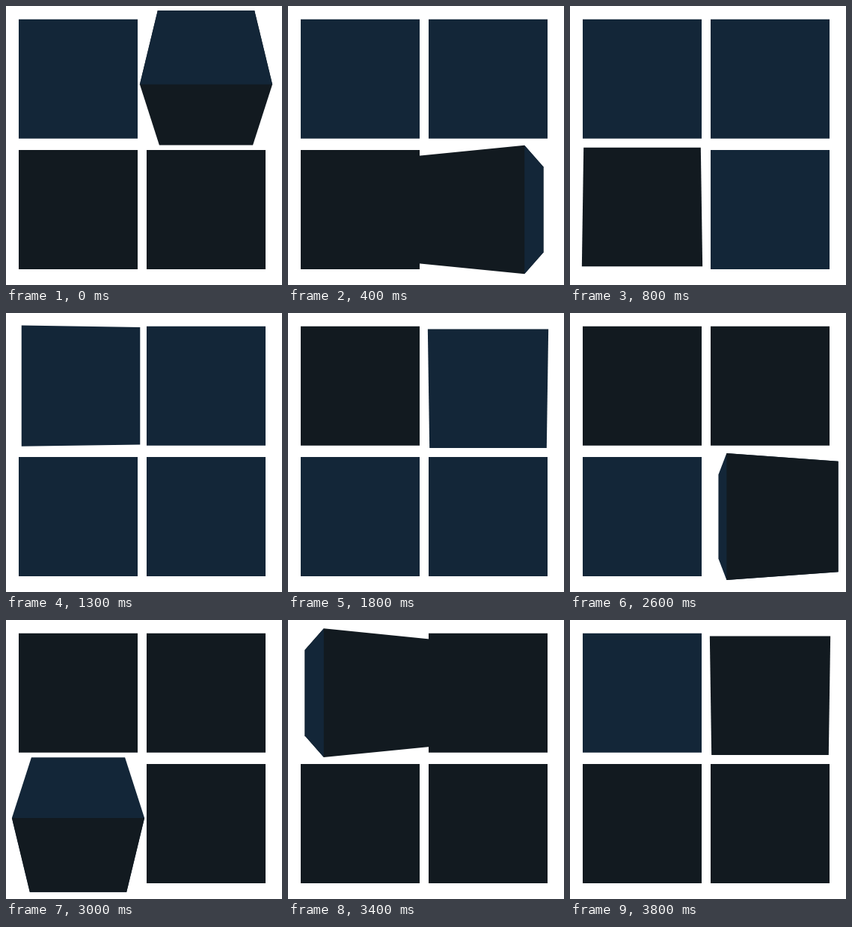
Write an HTML page with a canvas that moves like this. It is 369 px wide and 372 px high and loops after 3.9 s.

```html
<!DOCTYPE html>
<html lang="en">
<head>
<meta charset="utf-8">
<title>Turning cubes</title>
<style>
  html, body { margin: 0; width: 100%; height: 100%; overflow: hidden; background: #fff; }
  canvas { display: block; }
</style>
</head>
<body>
<canvas id="stage" width="369" height="372"></canvas>
<script>
const ctx = document.getElementById('stage').getContext('2d');
const LOOP = 3900, TICK = 100, TURN = 500, FIRST_TURN = 238;
const COLORS = ['#121a20', '#132638'];
// Cubes in turning order, clockwise from the bottom right
const CENTERS = [[267.5, 271.5], [96.5, 271.5], [96.5, 97.2], [267.5, 97.2]];

const easeInOut = x => (1 - Math.cos(Math.PI * x)) / 2;

// Perspective position and half length of a cube edge, at degrees from the viewer
function project(degrees) {
  const a = degrees * Math.PI / 180;
  const half = 318 / (5 - Math.SQRT2 * Math.cos(a));
  return { pos: Math.SQRT2 * Math.sin(a) * half, half };
}

function fillAcross(edges, color) {
  ctx.fillStyle = color;
  ctx.beginPath();
  for (const e of edges) ctx.lineTo(e.pos, e.half);
  for (const e of [...edges].reverse()) ctx.lineTo(e.pos, -e.half);
  ctx.fill();
}

function drawCube([x, y], i, time) {
  const n = (time - FIRST_TURN) / TURN - i;
  const cycle = Math.floor(n / 4);
  const angle = 90 * easeInOut(Math.min(n - cycle * 4, 1));
  const shade = (cycle + (i >> 1)) & 1;
  const [lead, crest, trail] = [45, -45, -135].map(d => project(d + angle));
  const oldVisible = lead.pos > crest.pos, newVisible = crest.pos > trail.pos;
  ctx.save();
  ctx.translate(x, y);
  ctx.rotate(Math.PI * (1 + i / 2));
  // The old colour runs under the new face, so no seam shows between them
  if (oldVisible) fillAcross(newVisible ? [lead, crest, trail] : [lead, crest], COLORS[shade]);
  if (newVisible) fillAcross([crest, trail], COLORS[1 - shade]);
  ctx.restore();
}

function render() {
  const time = Math.floor(performance.now() % LOOP / TICK) * TICK;
  ctx.clearRect(0, 0, 369, 372);
  CENTERS.forEach((center, i) => drawCube(center, i, time));
  requestAnimationFrame(render);
}
render();
</script>
</body>
</html>
```
